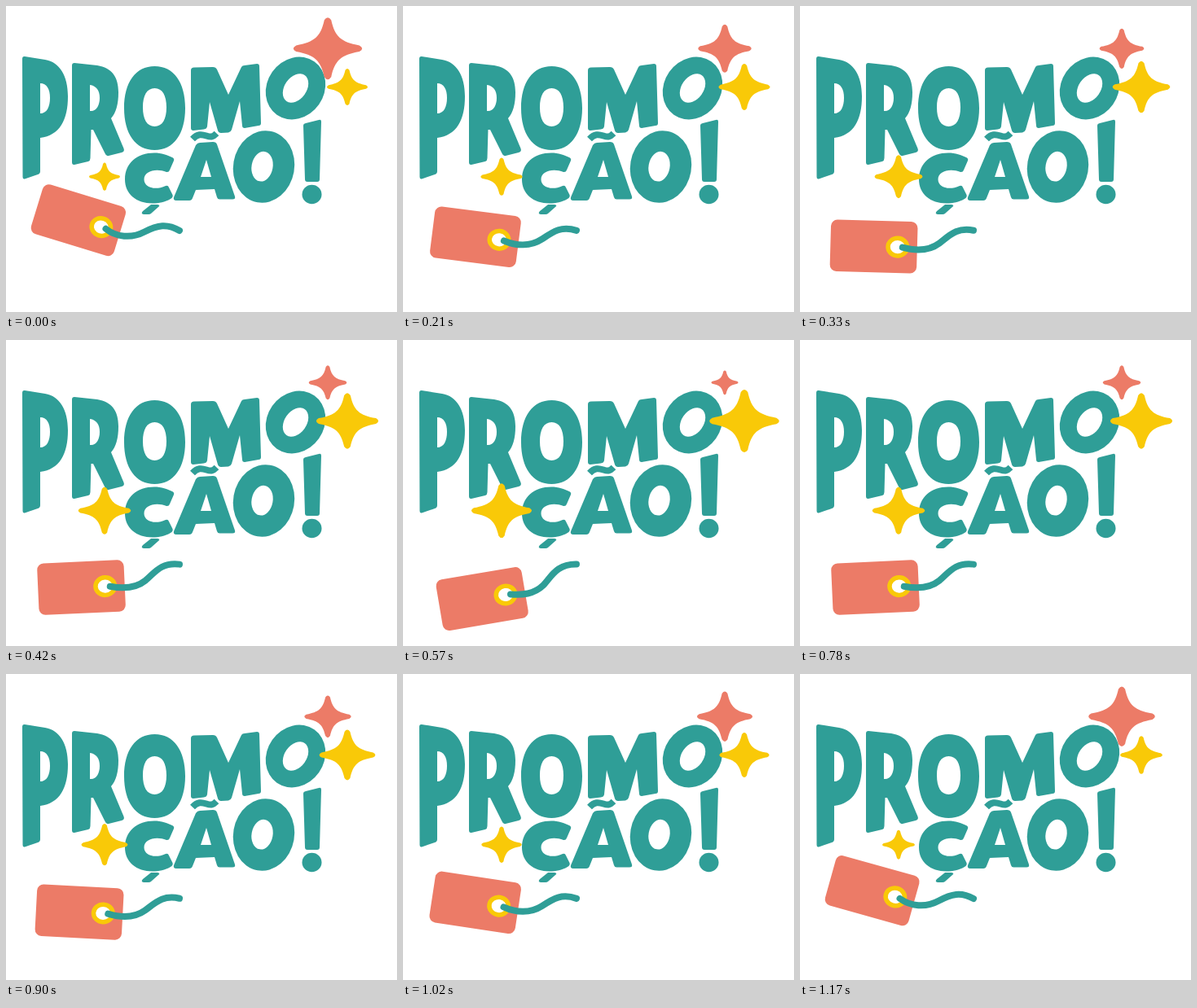
Animation of 480x376 px, one loop 1200 ms. Source, as an HTML page:

```html
<!DOCTYPE html>
<html lang="pt">
<head>
<meta charset="utf-8">
<title>Promoção!</title>
<style>
  html, body { margin: 0; height: 100%; overflow: hidden; background: #fff; }
  svg { display: block; width: 100%; height: 100%; }
</style>
</head>
<body>
<svg viewBox="0 0 480 376" role="img" aria-label="Promoção!">
  <defs>
    <path id="star" d="M-.1-.92Q0-1.08 .1-.92C.21-.38 .38-.21 .92-.1Q1.08 0 .92 .1C.38 .21 .21 .38 .1 .92Q0 1.08-.1 .92C-.21 .38-.38 .21-.92 .1Q-1.08 0-.92-.1C-.38-.21-.21-.38-.1-.92Z"/>
  </defs>

  <g fill="#2f9e97" fill-rule="evenodd">
    <!-- P R O M O -->
    <path d="M23 62L48 66C66 69 76 86 76 111C76 140 66 159 42 162V203Q42 206 39 207L23 212.500Q20.500 213 20.500 210L20 65Q20 61.500 23 62ZM42 95V132C50 132 54 124 54 113C54 102 50 95 42 95Z"/>
    <path d="M84 70L112 73C130 76 138 87 138 106C138 121 135 131 129 138L144.500 175Q146 179 142 180L126 184Q123 185 121.500 181L107 152H104.500L103.500 187Q103.500 190 101 191L84 195Q81 195.500 81 192V73Q81 70 84 70ZM103 97V129C111 130 115 122 115 113C115 104 111 98 103 97Z"/>
    <path d="M182.500 74C206 74 220 94 220 125.500C220 157 206 177 182.500 177C159 177 145 157 145 125.500C145 94 159 74 182.500 74ZM182.500 101C173 101 168 110 168 124.500C168 139 173 148 182.500 148C192 148 197 139 197 124.500C197 110 192 101 182.500 101Z"/>
    <path d="M231 75.500L254 75Q257.500 75 259 78L273 109L289 75Q290 73 293 73L308 71Q311 71 311 74L313 144Q313 147 310 147L293 150Q290 150 290 147L287 117L277 152Q276 155 273 155.500L264 156Q261 156 260 153L250 118L247 148Q246.500 151 243 151.500L230 153Q227 153 227 150V79Q227 75.500 231 75.500Z"/>
    <g transform="translate(355.500 101) rotate(35)">
      <path d="M0-40A35 40 0 0 1 0 40A35 40 0 0 1 0-40ZM0-19.500A13.500 19.500 0 0 0 0 19.500A13.500 19.500 0 0 0 0-19.500Z"/>
    </g>
    <!-- Ç Ã O ! -->
    <path d="M204 186Q207 187.500 206 190L201 201.500Q200 204.500 197 204C184 199 169.500 203 169.500 213C169.500 223 183 227 196 221Q199 220 200 223L204.500 232Q205.500 235 202 237C195 241 188 242.500 180 242.500C160 242.500 146 231 146 213C146 193 161 180.500 182 180.500C191 180.500 198 183 204 186Z"/>
    <path d="M178 244H186Q190 244.500 187 247L178 255Q177 256 175 256H169Q165 255.500 168 252Z"/>
    <path d="M238 168L254 167Q258 167 259 170L281 234Q282 237.500 278 237.500H263Q260 238 259 235L256 225L233 226L229 236Q228 239 225 239H209Q205 239 206 235L233 171Q235 168 238 168ZM246 189L239 210H252Z"/>
    <path d="M229 163.500C235 157 240 157.500 246 159.500S254 161 258.500 156.500" fill="none" stroke="#2f9e97" stroke-width="8"/>
    <g transform="translate(316.500 197.500) rotate(10)">
      <path d="M0-44.500A37.500 44.500 0 0 1 0 44.500A37.500 44.500 0 0 1 0-44.500ZM-2-18.500A13 18.500 0 0 0-2 18.500A13 18.500 0 0 0-2-18.500Z"/>
    </g>
    <path d="M368 144L384 140Q387 139 387 142L385 213Q385 216 382 216H370Q367 216 367 213L365 147Q365 144.500 368 144Z"/>
    <ellipse cx="375.500" cy="231.500" rx="12" ry="11.800"/>
  </g>

  <g id="tag">
    <rect x="38" y="267" width="106.500" height="63.500" rx="8" fill="#ec7b67"/>
    <ellipse cx="120.500" cy="298.600" rx="11.800" ry="10.800" fill="#fff" stroke="#f9c908" stroke-width="5.500"/>
  </g>
  <path id="string" fill="none" stroke="#2f9e97" stroke-width="8" stroke-linecap="round"/>
  <g id="stars"></g>
</svg>
<script>
  const LOOP = 1200, STEP = 30;
  const PIVOT = { x: 209, y: 273 };
  const KNOT = { x: -82.5, y: 26 }; // string start, seen from the pivot of the level tag
  const $ = id => document.getElementById(id);
  const mix = (a, b, u) => a + (b - a) * u;

  // Half widths run from r0 to r1 and back
  const stars = [
    { x: 395, y: 52.3, r0: 42.2, r1: 15.2, color: '#ec7b67' },
    { x: 419, y: 99.5, r0: 25, r1: 43.8, color: '#f9c908' },
    { x: 121, y: 209.7, r0: 19, r1: 38, color: '#f9c908' },
  ];
  for (const star of stars) {
    star.el = document.createElementNS('http://www.w3.org/2000/svg', 'use');
    star.el.setAttribute('href', '#star');
    star.el.setAttribute('fill', star.color);
    $('stars').append(star.el);
  }

  // String curve after the knot, with the tag raised and lowered
  const raised = [135, 284, 154, 286, 170, 277.5, 186, 269, 198, 267, 213, 276];
  const lowered = [147, 315, 161, 314, 172, 303, 182, 292, 188, 275.5, 213, 275.5];

  function draw(now) {
    const t = Math.floor(now % LOOP / STEP) * STEP;
    const u = 1 - Math.abs(1 - t / (LOOP / 2));
    for (const { el, x, y, r0, r1 } of stars) {
      const r = mix(r0, r1, u);
      el.setAttribute('transform', `translate(${x} ${y}) scale(${r} ${r * 0.9})`);
    }

    const angle = mix(17, -11, u);
    $('tag').setAttribute('transform', `rotate(${angle} ${PIVOT.x} ${PIVOT.y})`);
    const cos = Math.cos(angle * Math.PI / 180), sin = Math.sin(angle * Math.PI / 180);
    const x = PIVOT.x + KNOT.x * cos - KNOT.y * sin;
    const y = PIVOT.y + KNOT.x * sin + KNOT.y * cos;
    const curve = raised.map((v, i) => mix(v, lowered[i], u));
    $('string').setAttribute('d', `M${x} ${y}C${curve.join(' ')}`);
  }

  const start = performance.now();
  function tick() {
    draw(performance.now() - start);
    requestAnimationFrame(tick);
  }
  tick();
</script>
</body>
</html>
```
